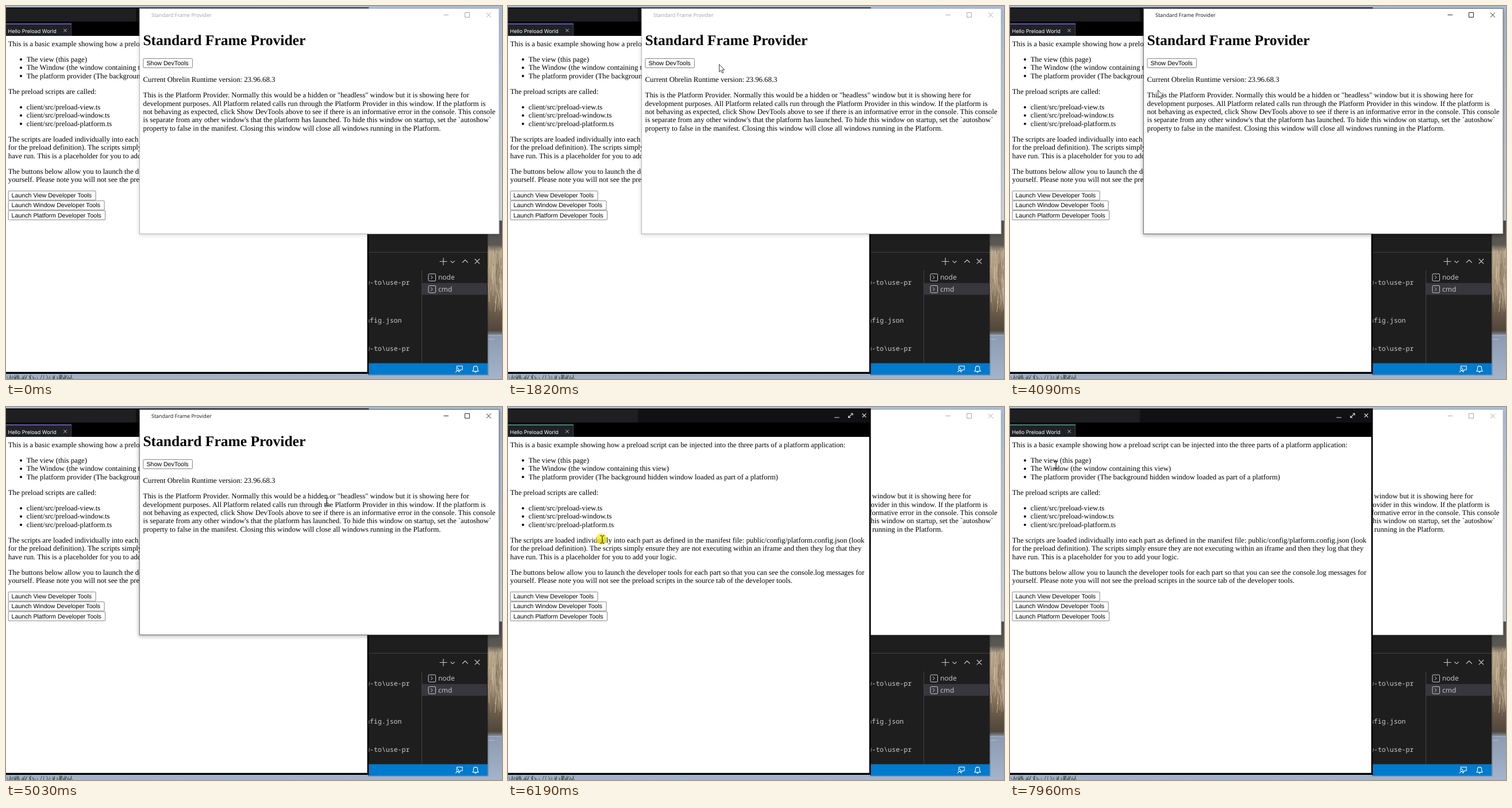
Recreate the animation shown at these times as an HTML page. Size 863 by 649 pixels, loop 8000 ms.

```html
<!DOCTYPE html>
<html lang="en">
<head>
<meta charset="utf-8">
<title>Preload scripts</title>
<style>
  html, body { margin: 0; width: 100%; height: 100%; overflow: hidden; background: #a9bdd8; }
  svg { display: block; width: 863px; height: 649px; }
  text { text-rendering: geometricPrecision; white-space: pre; }
  .serif { font: 12.75px "Liberation Serif", serif; }
  .head { font: bold 25.5px "Liberation Serif", serif; }
  .btn { font: 10.64px "Liberation Sans", sans-serif; }
  .cap { font: 9px "Open Sans", sans-serif; }
  .tab { font: 9px Inter, sans-serif; fill: #fff; }
  .side { font: 12px "Open Sans", sans-serif; fill: #ccc; }
  .mono { font: 11.6px "Noto Sans Mono", monospace; fill: #ccc; }
  .line { fill: none; stroke: currentColor; }
</style>
</head>
<body>
<svg id="stage" viewBox="0 0 863 649">
  <defs>
    <linearGradient id="view" x2="0" y2="1">
      <stop offset="0" stop-color="#a9c0de"/>
      <stop offset=".3" stop-color="#c3cfe0"/>
      <stop offset=".574" stop-color="#d2d9e3"/>
      <stop offset=".576" stop-color="#4e4f50"/>
      <stop offset=".64" stop-color="#5b5852"/>
      <stop offset=".66" stop-color="#b5a489"/>
      <stop offset=".75" stop-color="#a08d74"/>
      <stop offset=".82" stop-color="#6a5a49"/>
      <stop offset=".87" stop-color="#51463b"/>
      <stop offset=".885" stop-color="#8c9bb2"/>
      <stop offset="1" stop-color="#a3b4cb"/>
    </linearGradient>
    <filter id="soft" x="-10%" y="-10%" width="120%" height="120%"><feGaussianBlur stdDeviation="3.5"/></filter>
    <clipPath id="termClip"><path d="M631 397H723V621H631Z"/></clipPath>
  </defs>
  <path fill="url(#view)" d="M0 0H863V649H0Z"/>
  <g id="plants"></g>
  <g id="editor"></g>
  <g id="windows"><g id="page"></g><g id="provider"></g></g>
  <circle id="spot" r="9.7" fill="#f4ea10" opacity=".75"/>
  <g id="cursor">
    <path id="arrow" d="M.5 .5V13.6L3.5 10.9 5.6 15.7 7.7 14.8 5.7 10.1H9.7Z" fill="#fff" stroke="#222" stroke-width=".9"/>
    <path id="beam" class="line" color="#000" d="M-3.5-6.5H-.8M.8-6.5H3.5M0-6V6M-3.5 6.5H-.8M.8 6.5H3.5"/>
  </g>
</svg>
<script>
const $ = id => document.getElementById(id);
const rect = (x, y, w, h, fill, more = '') =>
  `<rect x="${x}" y="${y}" width="${w}" height="${h}" fill="${fill}" ${more}/>`;
const text = (cls, x, y, s, more = '') => `<text class="${cls}" x="${x}" y="${y}" ${more}>${s}</text>`;
const line = (d, color, width = 1) => `<path class="line" d="${d}" color="${color}" stroke-width="${width}"/>`;
const lines = (x, y, list) => list.map((s, i) => text('serif', x, y + i * 14.4, s)).join('');
const bullets = (y, list) => lines(35.8, y, list) +
  list.map((s, i) => `<circle cx="26" cy="${y + i * 14.4 - 3.8}" r="2"/>`).join('');
const button = (x, y, w, s) =>
  rect(x + .5, y + .5, w - 1, 16, '#fff', 'rx="1" stroke="#777" stroke-width=".9"') + text('btn', x + 6, y + 12, s);

function drawPlants() {
  let seed = 7, out = '';
  const rnd = () => (seed = seed * 16807 % 2147483647) / 2147483647;
  for (let i = 0; i < 70; i++) {
    const x = 838 + rnd() * 26, y = 418 + rnd() * 85;
    out += line(`M${x} ${y}l${rnd() * 8 - 4} ${16 + rnd() * 22}`, ['#cdbb9f', '#84735f', '#b7a488'][i % 3], .9);
  }
  for (let i = 0; i < 60; i++) {
    const x = 4 + rnd() * 112;
    out += line(`M${x} 649l${rnd() * 8 - 4} ${-2 - rnd() * 6}`, '#45504f', .9);
  }
  return out + line('M838 573H863M838 580H850', '#c0cad8', .8);
}

function drawEditor() {
  const term = (x, y, s) => text('mono', x, y, s, 'text-anchor="end"');
  const shell = (y, s) => rect(735, y - 6, 12.5, 12.5, 'none', 'rx="1.5" stroke="#ccc"') +
    line(`M739 ${y - 2.8}l3.2 3-3.2 3`, '#ccc') + text('side', 752, y + 4.3, s);
  return rect(630, 390, 210, 253, '#223', 'opacity=".2"') +
    rect(630, 390, 208, 251, '#1e1e1e') +
    line('M631 428.5H838M723.5 460V621', '#434343') +
    `<g clip-path="url(#termClip)">${term(702.5, 485, 'w-to\\use-pr')}${term(688.5, 551, 'nfig.json')}${term(702.5, 600, 'w-to\\use-pr')}</g>` +
    rect(724, 482, 113, 20.5, '#37373d') + shell(472, 'node') + shell(492.5, 'cmd') +
    line('M754.5 444.5H767.5M761 438V451M773.5 443.5l3.5 3.3 3.5-3.3M794 446.5l4.8-4.7 4.8 4.7M815.7 440l8.4 8.4M824.1 440l-8.4 8.4', '#ccc', 1.1) +
    rect(631, 621.5, 207, 20, '#007acc') +
    line('M784.5 630.5V626.5H794V633H791L789 635V633M782.7 637.5C783 633.5 788.2 633.5 788.6 637.5', '#fff', 1.1) +
    `<circle class="line" color="#fff" cx="785.7" cy="631.8" r="2"/>` +
    line('M812 635.5H822L820.6 633V630C820.6 625.5 813.4 625.5 813.4 630V633ZM815.7 636C816 638 818 638 818.3 636', '#fff', 1.1);
}

function drawPage() {
  return rect(0, 2.5, 631.3, 637.5, '#000') +
    rect(0, 4, 226, 23, '#1f1f22') + rect(226, 4, 404, 23, '#111114') +
    rect(0, 30, 114, 22, '#202126') + line('M113.5 31V52', '#44454b') +
    rect(0, 30.5, 114, 1.5, '#7a63d8', 'id="accent"') +
    text('tab', 3.5, 46.6, 'Hello Preload World') +
    line('M100.3 39.8l5.4 5.4M105.7 39.8l-5.4 5.4', '#ddd', .9) +
    line('M568 18.2H576.5M616.5 11.5l6.6 6.6M623.1 11.5l-6.6 6.6M592.8 18l6.4-6.4M596.3 11.3H599.7V14.7M592.4 15V18.4H595.8', '#ddd', 1.1) +
    rect(0, 52, 628.5, 584.7, '#fff') +
    lines(3.8, 69.6, ['This is a basic example showing how a preload script can be injected into the three parts of a platform application:']) +
    bullets(96.8, ['The view (this page)', 'The Window (the window containing this view)',
      'The platform provider (The background hidden window loaded as part of a platform)']) +
    lines(3.8, 152.8, ['The preload scripts are called:']) +
    bullets(180, ['client/src/preload-view.ts', 'client/src/preload-window.ts', 'client/src/preload-platform.ts']) +
    lines(3.8, 235.8, [
      'The scripts are loaded individually into each part as defined in the manifest file: public/config/platform.config.json (look',
      'for the preload definition). The scripts simply ensure they are not executing within an iframe and then they log that they',
      'have run. This is a placeholder for you to add your logic.']) +
    lines(3.8, 291.8, [
      'The buttons below allow you to launch the developer tools for each part so that you can see the console.log messages for',
      'yourself. Please note you will not see the preload scripts in the source tab of the developer tools.']) +
    button(3.6, 321.3, 153, 'Launch View Developer Tools') +
    button(3.6, 338.4, 168, 'Launch Window Developer Tools') +
    button(3.6, 355.5, 169.5, 'Launch Platform Developer Tools');
}

function drawProvider() {
  return rect(231, 6, 628.5, 393.5, '#000', 'id="shadow" filter="url(#soft)"') +
    rect(232.3, 4.3, 625.7, 392.2, '#fff', 'id="frame"') +
    `<g id="bar">${text('cap', 253, 19.4, 'Standard Frame Provider', 'fill="currentColor"')}
     <path class="line" d="M761.5 15.5H770M798.5 11.5H806.5V19.5H798.5ZM835.8 11.5l8.2 8.2M844 11.5l-8.2 8.2" stroke-width=".9"/></g>` +
    text('head', 238.4, 68.3, 'Standard Frame Provider') +
    button(238.4, 91, 86.5, 'Show DevTools') +
    lines(238.6, 132, ['Current Obrelin Runtime version: 23.96.68.3']) +
    lines(238.6, 159.2, [
      'This is the Platform Provider. Normally this would be a hidden or "headless" window but it is showing here for',
      'development purposes. All Platform related calls run through the Platform Provider in this window. If the platform is',
      'not behaving as expected, click Show DevTools above to see if there is an informative error in the console. This console',
      "is separate from any other window's that the platform has launched. To hide this window on startup, set the `autoshow`",
      'property to false in the manifest. Closing this window will close all windows running in the Platform.']);
}

$('plants').innerHTML = drawPlants();
$('editor').innerHTML = drawEditor();
$('page').innerHTML = drawPage();
$('provider').innerHTML = drawProvider();

// Pointer stops: time, x, y
const stops = [
  [722, 716, 650], [1190, 712, 632], [1580, 358, 187], [1640, 358, 187], [1820, 367, 101],
  [1930, 367, 101], [2140, 394, 182], [3442, 394, 182], [3832, 173, 231], [4066, 257, 146],
  [4144, 262, 140], [4300, 271, 153], [4312, 271, 153], [5014, 558, 165], [5170, 570, 164],
  [5250, 570, 164], [5260, 571, 164], [5402, 571, 164], [6090, 164, 230.5], [7354, 164, 230.5], [7960, 80, 101]
];
// The pointer moves in bursts: start, end, step
const bursts = [
  [800, 1580, 78], [1700, 1820, 60], [1990, 2140, 75], [3520, 4300, 78],
  [4390, 5170, 78], [5260, 5260, 78], [5480, 6090, 76.25], [7430, 7960, 75.71]
];
// Text rows, where the pointer becomes a beam
const pageRows = [[58, 73], [86, 129], [141, 156], [168, 212], [224, 268], [280, 310]];
const providerRows = [[121, 135], [148, 220]];

function pointerAt(t) {
  const [start, end, step] = bursts.filter(b => b[0] <= t).pop() || bursts[0];
  const s = Math.min(end, start + Math.floor((t - start) / step + 1e-6) * step);
  const i = stops.findIndex(k => k[0] >= s);
  if (i < 1) return stops[i < 0 ? stops.length - 1 : 0].slice(1);
  const [t0, x0, y0] = stops[i - 1], [t1, x1, y1] = stops[i];
  const u = (s - t0) / (t1 - t0), e = u * u * (3 - 2 * u);
  return [x0 + (x1 - x0) * e, y0 + (y1 - y0) * e];
}

const show = (id, on) => $(id).setAttribute('display', on ? 'inline' : 'none');
const within = (t, a, b) => t >= a && t < b;

function render(t) {
  const pageOnTop = t >= 6190, active = within(t, 2680, 6190);
  const top = $(pageOnTop ? 'page' : 'provider');
  if ($('windows').lastElementChild !== top) $('windows').append(top);
  $('bar').setAttribute('color', active ? '#111' : '#a0a0a0');
  $('frame').setAttribute('stroke', active ? '#666' : '#b0b0b0');
  $('shadow').setAttribute('opacity', active ? .28 : .12);
  $('accent').setAttribute('fill', pageOnTop ? '#43a88a' : '#7a63d8');

  const [x, y] = pointerAt(t);
  const rows = pageOnTop || x < 232 ? pageRows : providerRows;
  const overText = rows.some(([a, b]) => within(y, a, b));
  show('cursor', t >= 800);
  show('beam', overText);
  show('arrow', !overText);
  $('cursor').setAttribute('transform', `translate(${x} ${y})`);
  show('spot', within(t, 2680, 2830) || within(t, 6190, 6330));
  $('spot').setAttribute('cx', x - 1.3);
  $('spot').setAttribute('cy', y - 1);
}

const begin = performance.now();
function tick() {
  render((performance.now() - begin) % 8000);
  requestAnimationFrame(tick);
}
tick();
</script>
</body>
</html>
```
